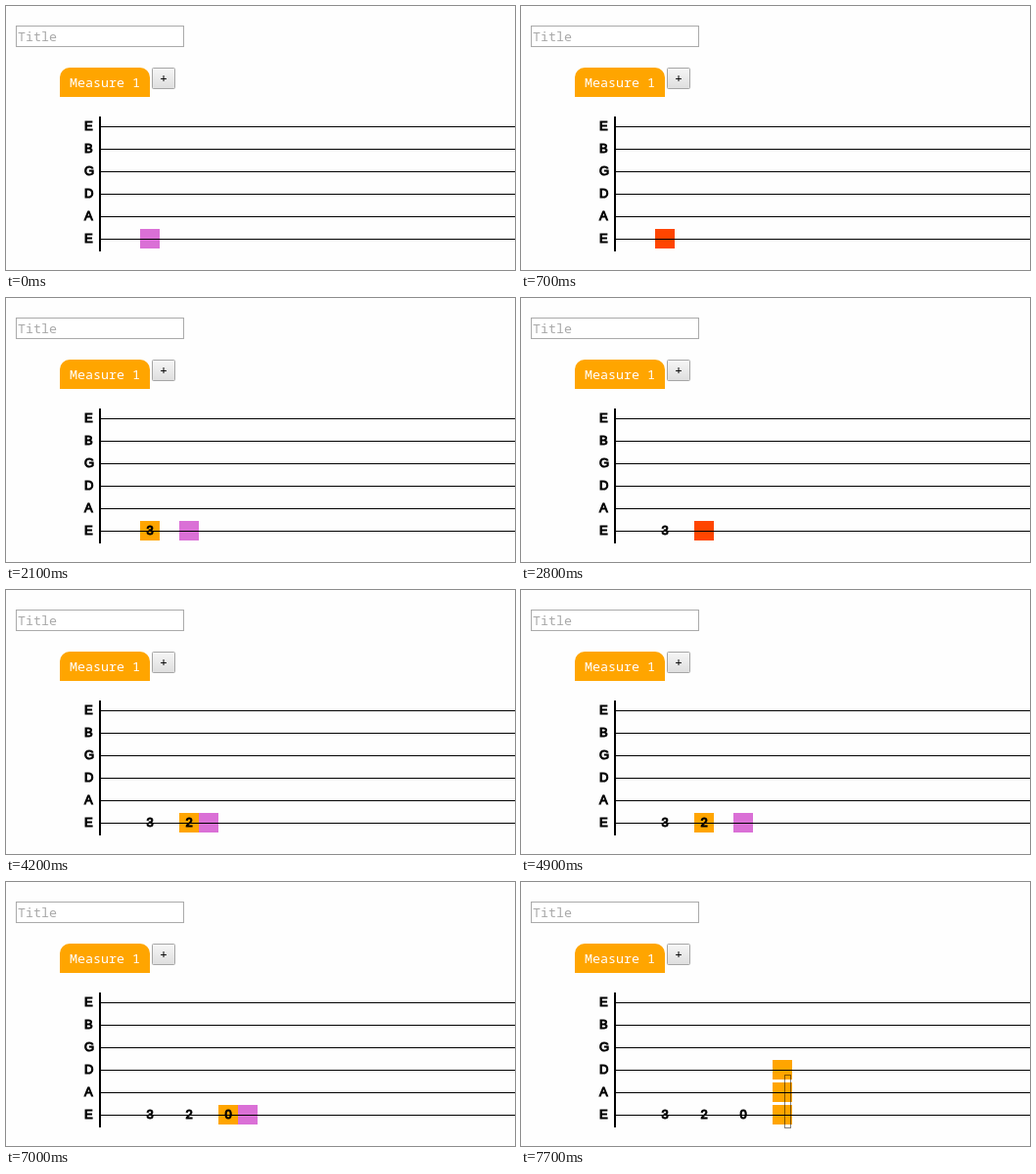
An HTML page for the animation above (8 s loop, 520 by 270 pixels).

```html
<!DOCTYPE html>
<html lang="en">
<head>
<meta charset="utf-8">
<title>Tablature editor</title>
<style>
  html, body { margin: 0; width: 100%; height: 100%; overflow: hidden; background: #fefefe; }
  svg { display: block; }
  .ui { font: 13.333px "Noto Sans Mono", "DejaVu Sans Mono", monospace; }
  .tab { font: 13px "Liberation Sans", Arial, sans-serif; stroke: #000; stroke-width: 1; }
</style>
</head>
<body>
<svg width="520" height="270" viewBox="0 0 520 270">
  <defs>
    <linearGradient id="face" x2="0" y2="1">
      <stop stop-color="#f6f6f6"/>
      <stop offset="1" stop-color="#dedede"/>
    </linearGradient>
  </defs>
  <g class="ui">
    <rect x="10.5" y="20.5" width="171" height="21" fill="#fff" stroke="#aaa"/>
    <text x="12" y="36" fill="#a9a9a9">Title</text>
    <path d="M55 93V73a10 10 0 0 1 10-10h72a10 10 0 0 1 10 10v20z" fill="#ffa500"/>
    <text x="65" y="83" fill="#fff">Measure 1</text>
    <rect x="149.5" y="63.5" width="23" height="21" rx="1" fill="url(#face)" stroke="#a6a6a6"/>
    <text x="157" y="79">+</text>
  </g>
  <g id="cells"></g>
  <g id="strings" class="tab"></g>
  <rect x="95" y="113" width="2" height="138"/>
  <g id="notes" class="tab" text-anchor="middle"></g>
  <rect id="focus" x="269.5" y="197.5" width="6" height="54" fill="none" stroke="#000" stroke-dasharray="1 1"/>
</svg>
<script>
const STEP = 700, LOOP = 8000, CELL = 20, LEFT = 137, LOW = 238, GAP = 23;
const $ = id => document.getElementById(id);
const colors = { hover: '#da70d6', active: '#ff4500', done: '#ffa500' };

// Each step lists [column, state, rows upward from the lowest string].
const steps = [
  [[0, 'hover']],
  [[0, 'active']],
  [[0, 'done'], [1, 'hover']],
  [[0, 'done'], [2, 'hover']],
  [[2, 'active']],
  [[2, 'active']],
  [[2, 'done'], [3, 'hover']],
  [[2, 'done'], [4, 'hover']],
  [[4, 'active']],
  [[4, 'active']],
  [[4, 'done'], [5, 'hover']],
  [[6, 'done', 3]]
];
// Typed frets: [step, column, fret]
const typed = [[2, 0, 3], [5, 2, 2], [9, 4, 0]];

$('strings').innerHTML = [...'EBGDAE'].map((name, i) => {
  const y = LOW - (5 - i) * GAP;
  return `<text x="80" y="${y + 4}">${name}</text>
    <rect x="96" y="${y}" width="424" height="1" stroke="none"/>`;
}).join('');

function draw(step) {
  $('cells').innerHTML = steps[step].map(([col, state, rows = 1]) =>
    Array.from({ length: rows }, (_, r) =>
      `<rect x="${LEFT + col * CELL}" y="${LOW - 10 - r * GAP}"
        width="${CELL}" height="${CELL}" fill="${colors[state]}"/>`).join('')).join('');
  $('notes').innerHTML = typed.filter(([at]) => step >= at).map(([, col, fret]) =>
    `<text x="${LEFT + col * CELL + 10}" y="${LOW + 4}">${fret}</text>`).join('');
  $('focus').style.display = step === steps.length - 1 ? '' : 'none';
}

let shown = -1, start;
function tick(now) {
  start ??= now;
  const step = Math.floor((now - start) % LOOP / STEP);
  if (step !== shown) draw(shown = step);
  requestAnimationFrame(tick);
}
draw(0);
requestAnimationFrame(tick);
</script>
</body>
</html>
```
